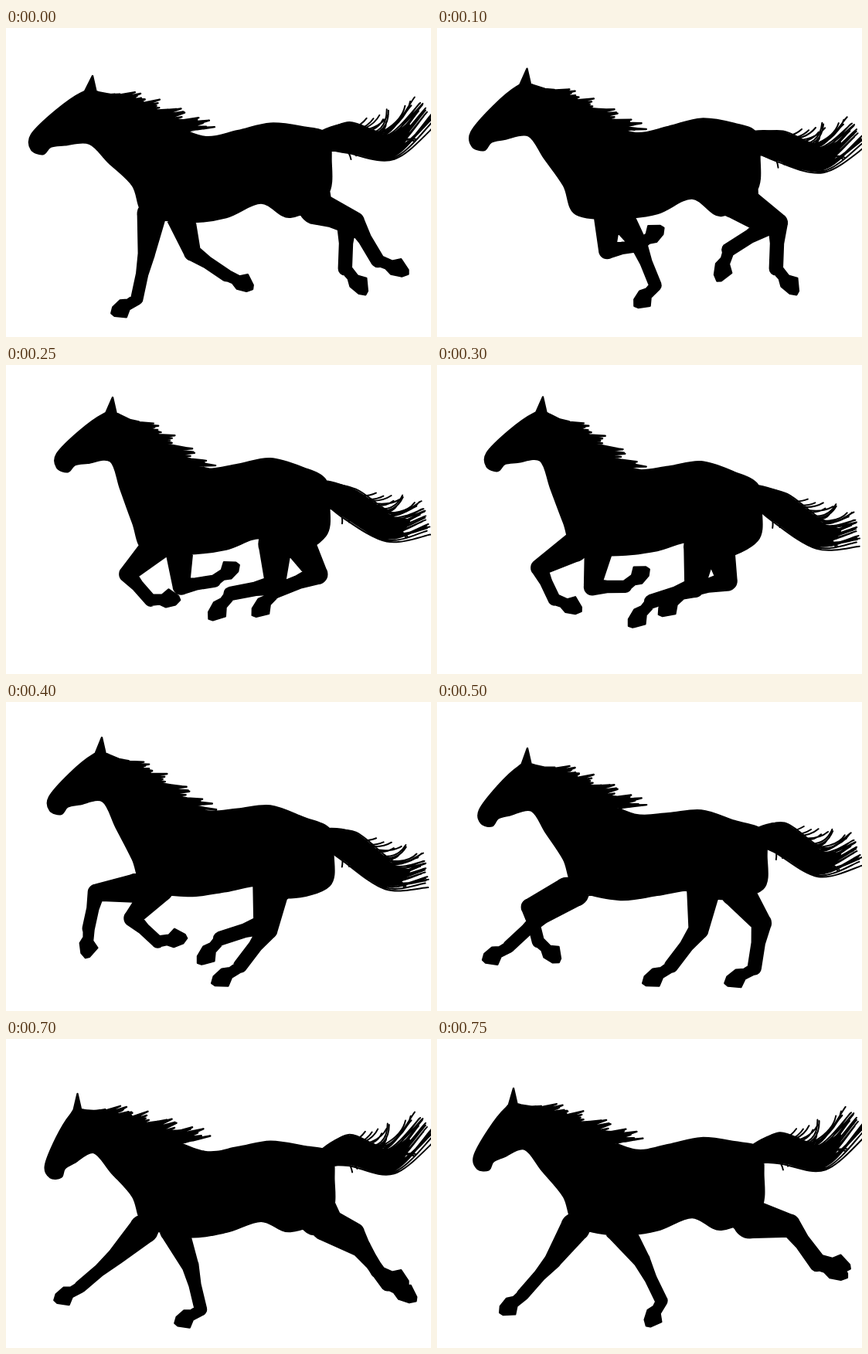
Animation of 550 by 400 pixels, one loop 800 ms. Source, as an HTML page:

```html
<!DOCTYPE html>
<html lang="en">
<head>
<meta charset="utf-8">
<title>Galloping horse</title>
<style>
html, body { margin: 0; width: 100%; height: 100%; overflow: hidden; background: #fff; }
svg { display: block; width: 100%; height: 100%; }
</style>
</head>
<body>
<svg viewBox="0 0 550 400">
  <path id="solid" stroke="#000" stroke-width="2.4" stroke-linejoin="round"/>
  <path id="hair" fill="none" stroke="#000" stroke-width="2" stroke-linecap="round"/>
</svg>
<script>
const LOOP = 800, STEP = 50;

// time, poll x y, top of nose x y
const HEAD = [
  [0, 116, 82, 33, 138], [150, 123, 68, 55, 133], [250, 142, 62, 66, 115],
  [400, 128, 66, 56, 123], [500, 121, 80, 55, 140], [600, 100, 102, 43, 172],
  [750, 103, 84, 48, 152]
];

// Stride of one leg: phase, x of the top joint, then the angles of its three
// bones from straight down, forward positive. Both legs of a pair share it.
const FORE = [
  [0, 225, -18, -56, -62], [85, 224, -3, -99, -123], [150, 206, 14, -86, -124],
  [240, 197, 43, -45, -95], [335, 168, 68, -14, -45], [420, 170, 84, 20, 20],
  [500, 178, 54, 47, 63], [600, 181, 28, 35, 52], [640, 190, 5, 9, 61],
  [750, 235, -35, -26, 31], [785, 235, -32, -36, -19]
];
const HIND = [
  [0, 401, -70, -31, -66], [50, 405, -78, -38, -75], [100, 395, -60, 2, -38],
  [150, 391, -68, 38, -10], [250, 376, -31, 68, 44], [375, 344, 5, 77, 40],
  [500, 345, 7, 37, 59], [600, 388, -37, 9, 63], [700, 415, -56, -36, -59],
  [750, 405, -82, -35, -67]
];
const FORE_LAG = 165, HIND_LAG = -100;

const solid = document.getElementById("solid");
const hair = document.getElementById("hair");

let seed = 7;
const rnd = (a, b) => a + (b - a) * (seed = seed * 16807 % 2147483647) / 2147483647;
const many = (n, make) => Array.from({ length: n }, (_, i) => make(i / (n - 1)));
const mane = many(46, k => ({
  u: 0.02 + 0.72 * k, len: rnd(22, 42) + 14 * k, turn: rnd(-9, 7), w: rnd(1, 2.4)
}));
const strands = many(20, k => ({ v: 2 * k - 1, end: rnd(0.82, 1.03), jig: rnd(-5, 5) }));
const wisps = many(14, k => ({
  u: rnd(0.1, 0.62), reach: rnd(0.22, 0.4), h: k < 0.7 ? rnd(-40, -22) : rnd(20, 32)
}));

const rad = a => a * Math.PI / 180;
const num = n => n.toFixed(1);
const at = p => num(p[0]) + " " + num(p[1]);
const mix = (a, b, k) => [a[0] + (b[0] - a[0]) * k, a[1] + (b[1] - a[1]) * k];
const off = (p, d, k) => [p[0] + d[0] * k, p[1] + d[1] * k];
const unit = (a, b) => {
  const x = b[0] - a[0], y = b[1] - a[1], l = Math.hypot(x, y) || 1;
  return [x / l, y / l];
};
const wave = (t, mid, amp, peak) => mid + amp * Math.cos(2 * Math.PI * (t - peak) / LOOP);

// Smooth cyclic interpolation through rows that begin with their time
function track(rows, time) {
  const t = (time % LOOP + LOOP) % LOOP, n = rows.length;
  const row = i => rows[(i + n) % n];
  const when = i => row(i)[0] + Math.floor(i / n) * LOOP;
  let i = n - 1;
  while (rows[i][0] > t) i--;
  const h0 = when(i) - when(i - 1), h = when(i + 1) - when(i), h2 = when(i + 2) - when(i + 1);
  const s = (t - when(i)) / h, s2 = s * s, s3 = s2 * s;
  return row(i).slice(1).map((b, j) => {
    const a = row(i - 1)[j + 1], c = row(i + 1)[j + 1], d = row(i + 2)[j + 1];
    const v0 = (b - a) / h0, v1 = (c - b) / h, v2 = (d - c) / h2;
    const m1 = (v0 * h + v1 * h0) / (h0 + h) * h;
    const m2 = (v1 * h2 + v2 * h) / (h + h2) * h;
    return (2 * s3 - 3 * s2 + 1) * b + (s3 - 2 * s2 + s) * m1 + (3 * s2 - 2 * s3) * c + (s3 - s2) * m2;
  });
}

function spline(p, closed) {
  const n = p.length;
  const get = i => closed ? p[(i + n) % n] : p[Math.max(0, Math.min(n - 1, i))];
  let d = "M" + at(p[0]);
  for (let i = 0; i < (closed ? n : n - 1); i++) {
    const a = get(i - 1), b = get(i), c = get(i + 1), e = get(i + 2);
    const c1 = [b[0] + (c[0] - a[0]) / 6, b[1] + (c[1] - a[1]) / 6];
    const c2 = [c[0] - (e[0] - b[0]) / 6, c[1] - (e[1] - b[1]) / 6];
    d += "C" + at(c1) + " " + at(c2) + " " + at(c);
  }
  return d + (closed ? "Z" : "");
}

// All filled shapes wind the same way, so overlaps stay solid
function shape(p, smooth) {
  const area = p.reduce((s, a, i) => {
    const b = p[(i + 1) % p.length];
    return s + a[0] * b[1] - b[0] * a[1];
  }, 0);
  if (area < 0) p = p.slice().reverse();
  return smooth ? spline(p, true) : "M" + p.map(at).join("L") + "Z";
}

const disc = (p, r) =>
  `M${num(p[0] - r)} ${num(p[1])}a${r} ${r} 0 1 1 ${2 * r} 0a${r} ${r} 0 1 1 ${-2 * r} 0Z`;

function hoof(ankle, toe) {
  const u = unit(ankle, toe), back = [u[1], -u[0]];
  const len = Math.hypot(toe[0] - ankle[0], toe[1] - ankle[1]);
  const spot = (along, across) => off(off(ankle, u, along * len), back, across);
  return shape([spot(0, -6), spot(0.3, -5), spot(0.52, -9), spot(0.85, -6), toe,
    spot(0.95, 5), spot(0.62, 14), spot(0.4, 7), spot(0, 7)]);
}

function limb(joints, radii) {
  let d = disc(joints[0], radii[0]);
  for (let i = 1; i < radii.length; i++) {
    const a = joints[i - 1], b = joints[i], u = unit(a, b), side = [u[1], -u[0]];
    d += disc(b, radii[i]) + shape([off(a, side, radii[i - 1]), off(b, side, radii[i]),
      off(b, side, -radii[i]), off(a, side, -radii[i - 1])]);
  }
  return d + hoof(joints[radii.length - 1], joints[radii.length]);
}

// Joints from the top one down; a folded knee foreshortens the cannon bone
function chain(top, angles, lengths, fold) {
  const bend = Math.abs(angles[0] - angles[1]) * fold;
  const joints = [top];
  angles.forEach((a, i) => {
    const dir = [-Math.sin(rad(a)), Math.cos(rad(a))];
    joints.push(off(joints[i], dir, lengths[i] - (i === 1 ? bend : 0)));
  });
  joints.splice(2, 0, mix(joints[1], joints[2], 0.45));
  return joints;
}

function foreLeg(phase, y) {
  const [x, ...angles] = track(FORE, phase);
  return limb(chain([x, y], angles, [52, 60, 38], 0.17), [18, 10, 7, 7]);
}

function hindLeg(phase, hip) {
  const [x, ...angles] = track(HIND, phase);
  const stifle = [x, wave(phase, 234, 10, 580)];
  return limb([hip, ...chain(stifle, angles, [53, 59, 43], 0)], [34, 21, 12, 8, 8]);
}

function manePaths(poll, crest, lift) {
  return mane.map(({ u, len, turn, w }) => {
    const k = u * 3, i = Math.min(2, Math.floor(k));
    const root = off(mix(crest[i], crest[i + 1], k - i), [0, 1], 2);
    const a = rad(lift * 0.75 - 7 + turn + 6 * u);
    const dir = [Math.cos(a), Math.sin(a)], side = [-dir[1], dir[0]];
    const mid = off(off(root, dir, len * 0.55), side, 2);
    return shape([off(root, side, -w - 1), off(mid, side, -w), off(root, dir, len),
      off(mid, side, w), off(root, side, w + 2)]);
  }).join("");
}

function tailPaths(t, dock) {
  const c = [
    [dock[0] - 12, dock[1] + 9], [443, wave(t, 164, 23, 365)],
    [496, wave(t, 188, 37, 370)], [543, wave(t, 160, 58, 365)]
  ];
  const side = c.map((_, i) => {
    const u = unit(c[Math.max(0, i - 1)], c[Math.min(3, i + 1)]);
    return [-u[1], u[0]];
  });
  const edge = (w, s) => c.slice(0, 3).map((q, i) => off(q, side[i], w[i] * s));
  const along = (u, h) => {
    const i = Math.min(2, Math.floor(u * 3));
    return off(mix(c[i], c[i + 1], u * 3 - i), side[i], h);
  };
  const core = [9, 18, 14];
  const fill = shape([...edge(core, 1), mix(c[2], c[3], 0.55), ...edge(core, -1).reverse()], true);
  const fan = strands.map(({ v, end, jig }) =>
    spline([...edge([8, 20, 19], v), off(mix(c[2], c[3], end), side[3], v * 20 + jig)]));
  const loose = wisps.map(({ u, reach, h }) =>
    "M" + at(along(u, h * 0.2)) + "Q" + at(along(u + reach * 0.8, h * 0.35)) + " " + at(along(u + reach, h)));
  return [fill, fan.join("") + loose.join("")];
}

function draw(t) {
  const [px, py, nx, ny] = track(HEAD, t);
  const poll = [px, py];
  const lift = 86 - py;

  // Head points turn and scale with the line from poll to nose
  const headLen = Math.hypot(nx - px, ny - py), tilt = Math.atan2(ny - py, nx - px);
  const skull = (turn, dist) => off(poll,
    [Math.cos(tilt - rad(turn)), Math.sin(tilt - rad(turn))], headLen * dist);
  const brow = skull(-28, 0.18), throat = skull(49, 0.68);

  // The back rocks as a wave that runs from croup to withers
  const withers = [257, wave(t, 141, 7, 600)];
  const loin = [342, wave(t, 129, 12, 540)];
  const croup = [385, wave(t, 139, 15, 500)];
  const dock = [wave(t, 417, 5, 560), wave(t, 151, 16, 470)];
  const sag = k => off(mix(poll, withers, k), [0, 1], lift * 0.6 * k);
  const crest = [poll, sag(0.33), sag(0.66), withers];
  const chest = [164, 204];

  const body = [
    brow, ...crest, off(mix(withers, loin, 0.5), [0, 1], 1), loin, croup, dock,
    [dock[0] + 5, dock[1] + 33], [dock[0], croup[1] + 88],
    [368, 249 + 0.4 * (croup[1] - 139)], [330, loin[1] + 103],
    [285, withers[1] + 104], [235, withers[1] + 110], [180, 241], chest,
    mix(chest, throat, 0.55), throat,
    skull(26, 0.8), skull(17, 0.92), skull(16, 1.06), skull(8, 1.12), [nx, ny], skull(-8, 0.57)
  ];
  const ear = shape([[px - 4, py - 20], [px + 1, py + 2], [px - 6, py + 8], off(brow, [1, 0], 3)]);
  const hip = [380, croup[1] + 55], elbow = withers[1] + 100;
  const [tail, lines] = tailPaths(t, dock);

  solid.setAttribute("d", shape(body, true) + ear + manePaths(poll, crest, lift)
    + foreLeg(t, elbow) + foreLeg(t - FORE_LAG, elbow)
    + hindLeg(t, hip) + hindLeg(t - HIND_LAG, hip) + tail);
  hair.setAttribute("d", lines);
}

const start = performance.now();
function frame(now) {
  const t = Math.max(0, now - start) % LOOP;
  draw(Math.floor(t / STEP) * STEP);
  requestAnimationFrame(frame);
}
draw(0);
requestAnimationFrame(frame);
</script>
</body>
</html>
```
